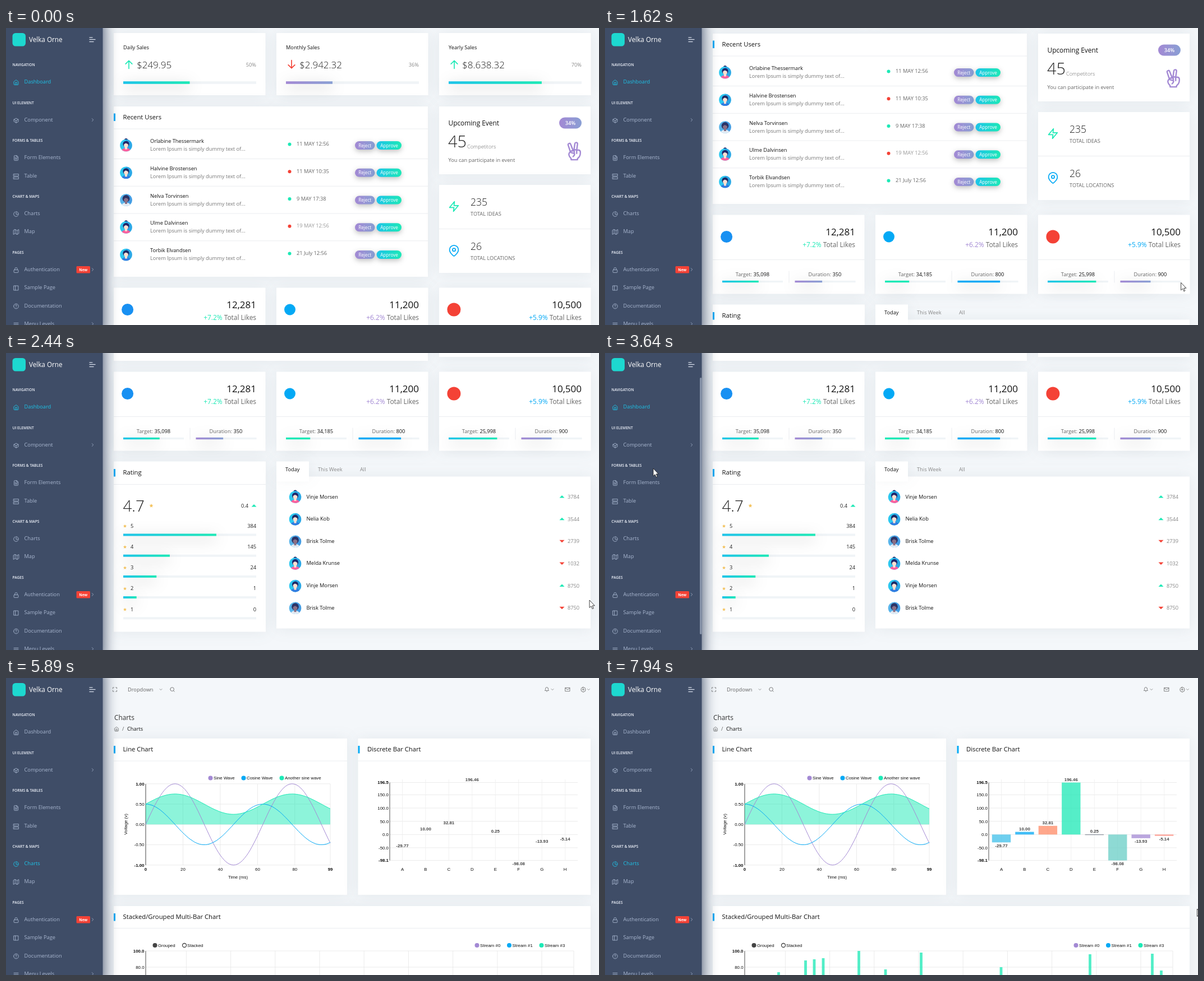
Write an HTML page that moves like this. It is 1057 by 530 pixels and loops after 8 s.

```html
<!DOCTYPE html>
<html lang="en">
<head>
<meta charset="utf-8">
<title>Admin dashboard</title>
<style>
  html, body { margin: 0; width: 100%; height: 100%; overflow: hidden; background: #f4f7fa; }
  svg { display: block; width: 100vw; height: 100vh; font-family: "Open Sans", sans-serif; }
  .chart { font-family: "Liberation Sans", Arial, sans-serif; }
  .card { filter: drop-shadow(0 1px 13px rgba(69, 90, 100, .09)); }
  .glow { filter: drop-shadow(0 6.5px 13px rgba(0, 0, 0, .3)); }
  .button { filter: drop-shadow(0 3px 5px rgba(0, 0, 0, .25)); }
  .side { filter: drop-shadow(1px 0 13px #3f4d67); }
</style>
</head>
<body>
<svg id="stage" viewBox="0 0 1057 530"></svg>
<script>
const TEAL = '#1de9b6', BLUE = '#04a9f5', PURPLE = '#a389d4', RED = '#f44236', GOLD = '#f4c25b';
const INK = '#111', GREY = '#666', MUTED = '#888', SIDE = '#a9b7d0';
const SEA = 'url(#sea)', LILAC = 'url(#lilac)';
const BOLD = 'font-weight="700"', LIGHT = 'font-weight="300"';
const END = 'text-anchor="end"', MID = 'text-anchor="middle"';

// Icon outlines on a 24 unit grid
const ICONS = {
  home: 'M3 9l9-7 9 7v11a2 2 0 0 1-2 2H5a2 2 0 0 1-2-2zM9 22V12h6v10',
  box: 'M21 16V8l-9-5-9 5v8l9 5zM3 8l9 5 9-5M12 22V13',
  file: 'M14 2H6a2 2 0 0 0-2 2v16a2 2 0 0 0 2 2h12a2 2 0 0 0 2-2V8zM14 2v6h6M16 13H8M16 17H8M10 9H8',
  server: 'M2 2h20v8H2zM2 14h20v8H2zM6 6h0M6 18h0',
  pie: 'M21.2 15.9A10 10 0 1 1 8 2.8M22 12A10 10 0 0 0 12 2v10z',
  map: 'M1 6v16l7-4 8 4 7-4V2l-7 4-8-4zM8 2v16M16 6v16',
  lock: 'M5 11h14a2 2 0 0 1 2 2v7a2 2 0 0 1-2 2H5a2 2 0 0 1-2-2v-7a2 2 0 0 1 2-2zM7 11V7a5 5 0 0 1 10 0v4',
  panel: 'M3 3h18v18H3zM9 3v18',
  help: 'M2 12a10 10 0 1 0 20 0a10 10 0 1 0-20 0M9 9a3 3 0 0 1 6 1c0 2-3 3-3 3M12 17h0',
  menu: 'M3 12h18M3 6h18M3 18h18',
  zap: 'M13 2L3 14h9l-1 8 10-12h-9z',
  pin: 'M21 10c0 7-9 13-9 13s-9-6-9-13a9 9 0 0 1 18 0zM9 10a3 3 0 1 0 6 0a3 3 0 1 0-6 0',
  up: 'M12 21V4M5 11l7-7 7 7',
  down: 'M12 3v17M5 13l7 7 7-7',
  right: 'M9 18l6-6-6-6',
  drop: 'M6 9l6 6 6-6',
  full: 'M8 3H3v5M21 8V3h-5M16 21h5v-5M3 16v5h5',
  search: 'M3 11a8 8 0 1 0 16 0a8 8 0 1 0-16 0M21 21l-4.3-4.3',
  bell: 'M18 8A6 6 0 0 0 6 8c0 7-3 9-3 9h18s-3-2-3-9M13.7 21a2 2 0 0 1-3.4 0',
  mail: 'M2 4h20v16H2zM22 6l-10 7L2 6',
  gear: 'M9 12a3 3 0 1 0 6 0a3 3 0 1 0-6 0M10 2h4l1 3 3-1 3 3-1 3 2 1v3l-2 1 1 3-3 3-3-1-1 3h-4l-1-3-3 1-3-3 1-3-2-1v-3l2-1-1-3 3-3 3 1z',
  peace: 'M7 13L4.3 4.600a1.600 1.600 0 0 1 3.100-1.100L10.500 11.500M11.500 11l1.200-8.200a1.600 1.600 0 0 1 3.300.4L15 11M7 13c-3 2-2 6 1 8.500V23h8v-1.500c3-2 4-5 3.500-9q-1-2.500-4-1.500-4-1.500-5 1-3-.5-3 1zM8 14l4 1q1 2-1.500 4M15 11v4M12 12v3'
};

const text = (x, y, s, size = 9.25, fill = GREY, more = '') =>
  `<text x="${x}" y="${y}" font-size="${size}" fill="${fill}" ${more}>${s}</text>`;
const label = (x, y, s, more = '') => text(x, y, s, 7.86, '#111', more);
const rect = (x, y, w, h, fill, more = '') =>
  `<rect x="${x}" y="${y}" width="${w}" height="${h}" fill="${fill}" ${more}/>`;
const dot = (x, y, r, fill, more = '') => `<circle cx="${x}" cy="${y}" r="${r}" fill="${fill}" ${more}/>`;
const line = (x1, y1, x2, y2, color = '#e6e9ed', w = .8) =>
  `<path d="M${x1} ${y1}L${x2} ${y2}" stroke="${color}" stroke-width="${w}"/>`;
const icon = (name, x, y, size, color = 'currentColor', weight = 2) =>
  `<path d="${ICONS[name]}" transform="translate(${x - size / 2} ${y - size / 2}) scale(${size / 24})" fill="none"
    stroke="${color}" stroke-width="${weight}" stroke-linecap="round" stroke-linejoin="round"/>`;
const card = (x, y, w, h) => rect(x, y, w, h, '#fff', 'class="card"');
const heading = (x, y, s) => rect(x, y - 10, 3, 13.500, BLUE) + text(x + 16.500, y, s, 11.25, INK);
const progress = (x, y, w, h, part, fill) =>
  rect(x, y - h / 2, w, h, '#f0f4f7') + rect(x, y - h / 2, w * part, h, fill, 'class="glow"');
const trend = (x, y, rising) =>
  `<path d="M${x - 4.500} ${y + (rising ? 2 : -2)}h9l-4.500 ${rising ? -4.500 : 4.500}z" fill="${rising ? TEAL : RED}"/>`;
const star = (x, y, r) => {
  const points = Array.from({ length: 10 }, (_, i) => {
    const a = i * Math.PI / 5, d = i % 2 ? r * .45 : r;
    return (x + d * Math.sin(a)).toFixed(2) + ',' + (y - d * Math.cos(a)).toFixed(2);
  });
  return `<polygon points="${points.join(' ')}" fill="${GOLD}"/>`;
};
const each = (list, draw) => list.map(draw).join('');

function avatar(x, y, kind) {
  const [shirt, skin, hair] = [
    ['#ff5f9e', '#fde0d2', '#20276b'], ['#2f7be0', '#fde0d2', '#1d2a66'], ['#e4edf5', '#8a6f86', '#2b3467']
  ][kind];
  const back = kind === 2 ? '#58b4ea' : '#2cc8f0';
  const bun = kind === 0 ? dot(0, -9.500, 3, hair) : '';
  return `<g transform="translate(${x} ${y})">${bun}${dot(0, 0, 10.800, back)}
    <g clip-path="url(#round)"><path d="M0-11a11 11 0 0 1 0 22z" fill="#2a7fdc" opacity=".45"/>
    ${dot(0, -2.500, kind === 2 ? 6.400 : 5.600, hair)}
    <ellipse cy="11" rx="8.500" ry="6.500" fill="${shirt}"/>${rect(-2, 1, 4, 6, skin)}
    <ellipse cy="-.5" rx="3.900" ry="4.600" fill="${skin}"/>
    <path d="M-4.500-1.500q0-5 4.500-5t4.500 5q-3-2-5-2.500-2 1-4 2.500z" fill="${hair}"/></g></g>`;
}

function salesCard([x, title, direction, amount, percent, part, fill]) {
  return card(x, 9, 270.500, 111) + text(x + 17, 38, title, 9.25, INK)
    + icon(direction, x + 27, 65, 20, direction === 'up' ? TEAL : RED)
    + text(x + 41, 72, amount, 17, '#222', LIGHT) + text(x + 254, 69, percent, 9.25, MUTED, END)
    + progress(x + 17, 97.500, 237, 4.600, part, fill);
}

function userRow([name, date, online], i) {
  const y = 48.750 * i;
  return `<g transform="translate(0 ${y})">` + avatar(214, 209.500, i % 3)
    + text(257, 205, name, 9.25, INK) + text(257, 219, 'Lorem Ipsum is simply dummy text of...', 9.25, '#777')
    + dot(505.500, 207.500, 3, online ? TEAL : RED)
    + text(518, 210, date, 9.25, i === 3 ? '#999' : GREY)
    + rect(622, 202, 35.500, 15, LILAC, 'rx="7.500" class="button"') + rect(660.500, 202, 44.500, 15, SEA, 'rx="7.500" class="button"')
    + text(639.700, 212.600, 'Reject', 8.1, '#fff', MID) + text(683, 212.600, 'Approve', 8.1, '#fff', MID)
    + (i < 4 ? line(192, 233.500, 752, 233.500) : '') + '</g>';
}

function socialCard([x, mark, radius, count, change, tint, goals]) {
  return card(x, 52, 270.500, 141) + dot(x + 12 + radius * 1.200, 91, radius, mark)
    + text(x + 254, 88.500, count, 17, INK, END)
    + text(x + 254, 109, `<tspan fill="${tint}">${change}</tspan> Total Likes`, 11.9, GREY, END)
    + line(x, 132, x + 270.500, 132) + line(x + 136, 152, x + 136, 173)
    + each(goals, ([name, value, part, fill], i) =>
      text(x + 71 + i * 129, 161, `${name}: <tspan fill="${INK}">${value}</tspan>`, 9.25, GREY, MID)
      + progress(x + 17 + i * 129.500, 171, 108, 3.400, part, fill));
}

const ratingRow = ([count, part], i) => {
  const y = 37.200 * i;
  return star(212, 327.500 + y, 3.200) + text(222, 330.300 + y, 5 - i, 9.25, '#222')
    + text(446, 330.300 + y, count, 9.25, '#222', END) + progress(209, 343 + y, 237, 4, part, SEA);
};

const rankRow = ([name, value, rising], i) => {
  const y = 39.650 * i;
  return avatar(515.500, 275.500 + y, i % 3) + text(535.500, 278 + y, name, 9.25, INK)
    + trend(991, 275 + y, rising) + text(1001, 278.500 + y, value, 9.25, MUTED);
};

const dashboard = each([
  [192, 'Daily Sales', 'up', '$249.95', '50%', .5, SEA],
  [482, 'Monthly Sales', 'down', '$2.942.32', '36%', .35, LILAC],
  [772, 'Yearly Sales', 'up', '$8.638.32', '70%', .7, SEA]], salesCard)
  + card(192, 140, 560, 304) + heading(192, 162.500, 'Recent Users') + line(192, 180, 752, 180)
  + each([
    ['Orlabine Thessermark', '11 MAY 12:56', 1], ['Halvine Brostensen', '11 MAY 10:35', 0],
    ['Nelva Torvinsen', '9 MAY 17:38', 1], ['Ulme Dalvinsen', '19 MAY 12:56', 0],
    ['Torbik Elvandsen', '21 July 12:56', 1]], userRow)
  + card(772, 140, 270, 121) + text(788.500, 173.500, 'Upcoming Event', 11.9, INK)
  + rect(986, 159.500, 40, 20, LILAC, 'rx="10"') + text(1006, 173, '34%', 9.25, '#fff', MID + ' font-weight="600"')
  + text(788, 213, '45', 28.8, '#222', LIGHT) + text(822, 215, 'Competitors', 9.2, GREY, LIGHT)
  + text(788.500, 239, 'You can participate in event') + icon('peace', 1013, 219.500, 34, PURPLE, 1.700)
  + card(772, 280, 270, 157) + line(772, 358.500, 1042, 358.500)
  + icon('zap', 798.500, 318.500, 21, TEAL) + text(828, 317, '235', 17.5, '#222', LIGHT) + text(828, 335, 'TOTAL IDEAS')
  + icon('pin', 798.500, 397.500, 21, BLUE) + text(828, 395.500, '26', 17.5, '#222', LIGHT) + text(828, 414, 'TOTAL LOCATIONS')
  + '<g transform="translate(0 411.500)">'
  + each([
    [192, '#1890f2', 10.500, '12,281', '+7.2%', TEAL, [['Target', '35,098', .6, SEA], ['Duration', 350, .45, LILAC]]],
    [482, BLUE, 10, '11,200', '+6.2%', PURPLE, [['Target', '34,185', .4, TEAL], ['Duration', 800, .7, BLUE]]],
    [772, RED, 12, '10,500', '+5.9%', BLUE, [['Target', '25,998', .8, SEA], ['Duration', 900, .5, LILAC]]]], socialCard)
  + card(192, 212, 271, 304) + heading(192, 235.500, 'Rating') + line(192, 253, 463, 253)
  + text(208.500, 301, '4.7', 27.8, '#222', LIGHT) + star(259, 291, 3.700)
  + text(432, 294.300, '0.4', 9.25, '#222', END) + trend(442, 291, true)
  + each([[384, .7], [145, .35], [24, .25], [1, .1], [0, 0]], ratingRow)
  + card(482, 239, 560, 271) + card(482, 212, 58, 28) + rect(482, 238, 58, 10, '#fff')
  + text(498, 229.500, 'Today', 9.25, INK) + text(556, 229.500, 'This Week', 9.25, MUTED) + text(631, 229.500, 'All', 9.25, MUTED)
  + each([
    ['Vinje Morsen', 3784, 1], ['Nelia Kob', 3544, 1], ['Brisk Tolme', 2739, 0],
    ['Melda Krunse', 1032, 0], ['Vinje Morsen', 8750, 1], ['Brisk Tolme', 8750, 0]], rankRow)
  + '</g>';

const GRID = '#e6e6e6';
const legend = (x, y, fill, name) => dot(x, y, 4, fill) + label(x + 5.500, y + 2.800, name);

function lineChart() {
  const px = i => 249 + i * 329 / 99, py = v => 261.300 - v * 72.500;
  const curve = f => Array.from({ length: 100 }, (_, i) => `${px(i).toFixed(1)} ${py(f(i / 10)).toFixed(1)}`).join('L');
  const stroke = (f, color) => `<path d="M${curve(f)}" fill="none" stroke="${color}"/>`;
  const wave = a => .5 + .25 * Math.sin(a);
  return legend(364.500, 178.500, PURPLE, 'Sine Wave') + legend(423.500, 178.500, BLUE, 'Cosine Wave')
    + legend(491.500, 178.500, TEAL, 'Another sine wave')
    + each([1, .5, 0, -.5, -1], v => line(249, py(v), 578, py(v), GRID)
      + label(246.500, py(v) + 2.800, v.toFixed(2), END + (Math.abs(v) === 1 ? BOLD : '')))
    + each([0, 20, 40, 60, 80, 99], i => line(px(i), 189, px(i), 334, GRID)
      + label(px(i), 344, i, MID + (i % 99 ? '' : BOLD)))
    + line(249, 189, 249, 334, '#222')
    + `<path d="M249 ${py(0)}L${curve(wave)}V${py(0)}z" fill="${TEAL}" opacity=".5"/>`
    + stroke(Math.sin, PURPLE) + stroke(a => .5 * Math.cos(a), BLUE) + stroke(wave, TEAL)
    + label(413.500, 358, 'Time (ms)', MID) + label(0, 0, 'Voltage (v)', MID + ' transform="translate(215.500 261) rotate(-90)"');
}

function barChart() {
  const py = v => 279.300 - v * .4719, px = i => 706.500 + i * 41.450;
  const bars = [
    [-29.77, '#3ebfea'], [10, BLUE], [32.81, '#ff8a65'], [196.46, TEAL],
    [.25, '#4c5667'], [-98.08, '#69cec6'], [-13.93, PURPLE], [-5.14, '#fe8a7d']];
  return each([196.5, 150, 100, 50, 0, -50, -98.1], (v, i) => line(684, py(v), 1019, py(v), GRID)
      + label(682, py(v) + 2.800, v.toFixed(1), END + (i % 6 ? '' : BOLD)))
    + each(bars, (_, i) => line(px(i), 181, px(i), 325.500, '#eee') + label(px(i), 344, 'ABCDEFGH'[i], MID))
    + line(684, 186.500, 684, 325.500, '#222')
    + '<g id="bars">' + each(bars, ([v, fill], i) =>
      rect(px(i) - 16.700, Math.min(py(v), py(0)), 33.400, Math.max(1, Math.abs(py(v) - py(0))), fill)) + '</g>'
    + each(bars, ([v], i) => text(px(i), v < 0 ? py(v) + 8.600 : py(v) - 2.800, v.toFixed(2), 7.86, '#444', MID + BOLD));
}

function streamChart() {
  const tops = [[309.5, 525], [357.5, 504], [373, 502], [389, 500], [452.5, 487], [500, 520],
    [563.5, 490], [706, 516], [864.5, 493], [975.5, 492], [991.5, 522]];
  return dot(265.500, 477, 4, '#444') + label(271, 479.800, 'Grouped')
    + dot(318, 477, 3.500, '#fff', 'stroke="#444" stroke-width="1.300"') + label(323, 479.800, 'Stacked')
    + legend(839.500, 477, PURPLE, 'Stream #0') + legend(897, 477, BLUE, 'Stream #1') + legend(954.500, 477, TEAL, 'Stream #3')
    + line(249, 487, 1012, 487, GRID) + line(249, 516, 1012, 516, GRID)
    + each([...Array(10).keys()], i => { const x = i < 9 ? 321.400 + i * 79.200 : 1012; return line(x, 487, x, 530, GRID); })
    + line(249, 487, 249, 530, '#222')
    + label(246.500, 489.800, '100.0', END + BOLD) + label(246.500, 518.800, '80.0', END)
    + `<g id="streams" fill="${TEAL}" opacity=".76">` + each(tops, ([x, y]) => rect(x - 2.400, y, 4.800, 632 - y, TEAL)) + '</g>';
}

const charts = `<g color="${GREY}">` + icon('full', 194, 20.500, 9.500) + text(217, 24, 'Dropdown') + icon('drop', 276, 20.500, 8)
  + icon('search', 296.500, 20.500, 10) + icon('bell', 964, 20.500, 9.500) + icon('drop', 974, 20.500, 8)
  + icon('mail', 1001, 20.500, 9.500) + icon('gear', 1029, 20.500, 10) + icon('drop', 1038.500, 20.500, 8)
  + text(193, 75, 'Charts', 11.8, '#333') + icon('home', 197, 91, 9) + text(207, 94.300, '/')
  + text(216, 94.300, 'Charts', 9.25, INK, 'font-weight="500"') + '</g>'
  + '<g id="cards">' + card(192, 108, 416, 279) + heading(192, 131, 'Line Chart') + line(192, 148, 608, 148)
  + card(627.500, 108, 414.500, 279) + heading(627.500, 131, 'Discrete Bar Chart') + line(627.500, 148, 1042, 148)
  + card(192, 407, 850, 300) + heading(192, 430, 'Stacked/Grouped Multi-Bar Chart') + line(192, 446.500, 1042, 446.500)
  + '<g class="chart">' + lineChart() + barChart() + streamChart() + '</g></g>';

const sidebar = rect(-20, -20, 192.500, 570, '#3f4d67', 'class="side"')
  + rect(11.500, 9, 23.500, 23.500, '#1dd8d0', 'rx="5.500"') + text(41, 25, 'Velka Orne', 11.7, '#fff')
  + each([[17, 6], [20.5, 11], [24.5, 8]], ([y, w]) => line(148.500, y, 148.500 + w, y, '#dce3ef', 1.200))
  + each([['NAVIGATION', 65], ['UI ELEMENT', 133], ['FORMS &amp; TABLES', 200], ['CHART &amp; MAPS', 300], ['PAGES', 400]],
    ([s, y]) => text(11.500, y + 2.500, s, 6.6, '#eef2fa', 'font-weight="600"'))
  + each([
    ['Dashboard', 96, 'home'], ['Component', 164, 'box'], ['Form Elements', 231, 'file'], ['Table', 264, 'server'],
    ['Charts', 331, 'pie'], ['Map', 363, 'map'], ['Authentication', 431, 'lock'], ['Sample Page', 463, 'panel'],
    ['Documentation', 495.5, 'help'], ['Menu Levels', 528, 'menu']], ([name, y, picture]) =>
    `<g id="item-${name.split(' ')[0]}" color="${SIDE}">${icon(picture, 18, y + 1, 10.500)}${text(32.500, y + 3.300, name, 9.25, 'currentColor')}</g>`)
  + each([164, 431, 528], y => icon('right', 154.500, y, 9.500, SIDE))
  + rect(125.500, 425, 24.500, 12.500, RED, 'rx="1.500"') + text(137.700, 433.500, 'New', 6.6, '#fff', MID + BOLD)
  + rect(169, 44, 3.500, 458, '#8793a9', 'rx="1.700" id="thumb"');

const stage = document.getElementById('stage');
stage.innerHTML = `<defs>
  <linearGradient id="sea"><stop stop-color="#1dc4e9"/><stop offset="1" stop-color="${TEAL}"/></linearGradient>
  <linearGradient id="lilac"><stop stop-color="${PURPLE}"/><stop offset="1" stop-color="#899fd4"/></linearGradient>
  <clipPath id="round"><circle r="10.800"/></clipPath></defs>
  ${rect(0, 0, 1057, 530, '#f4f7fa')}<g id="dashboard">${dashboard}</g><g id="charts">${charts}</g>${sidebar}
  <g id="status"><path d="M0 520h295q3 0 3 3v7H0z" fill="#2b2c2f"/>${text(3, 532, '', 9.25, '#c8cacd', 'id="link"')}</g>
  <path id="cursor" d="M0 0V13.500L3.100 10.700L5.200 15.500L7.300 14.600L5.200 9.900H9.300z" fill="#fff" stroke="#111" stroke-width=".8"/>`;

// Each key: step, then the values reached at that step
const SCROLL = [[0, 0], [2, 0], [3, 4], [4, 130], [5, 330], [6, 411.5], [7, 430]];
const POINTER = [[0, 985, 560], [1, 990, 525], [3, 1020, 461], [6, 1040, 441], [10, 1040, 441], [12, 270, 250],
  [14, 86, 206], [18, 40, 325], [19, 27, 365], [20, 21, 410], [22, 14, 480], [24, 8, 560], [30, 920, 560],
  [31, 942, 515], [35, 1055.5, 412]];
const FADE = [[26, 0], [28, .25], [30, .75]];
const GROW = [[28, 0], [30, 1]];

function sample(keys, step) {
  const next = keys.findIndex(k => k[0] > step);
  if (next === 0) return keys[0].slice(1);
  if (next < 0) return keys.at(-1).slice(1);
  const a = keys[next - 1], b = keys[next], p = (step - a[0]) / (b[0] - a[0]);
  return a.slice(1).map((v, i) => v + (b[i + 1] - v) * p);
}

const get = id => document.getElementById(id);
const move = (id, x, y) => get(id).setAttribute('transform', `translate(${x} ${y})`);
const show = (id, on) => get(id).setAttribute('display', on ? 'inline' : 'none');

function render(step) {
  const onCharts = step >= 19;
  show('dashboard', !onCharts);
  show('charts', onCharts);
  show('cards', step >= 22);
  show('thumb', step >= 13 && step < 25);
  show('status', step >= 17 && step < 25);
  get('link').textContent = 'lite.velmorants.test/velka-orne/basic/default/' + (onCharts ? 'maps/region-map' : 'charts/line-plot');
  get('item-Dashboard').setAttribute('color', onCharts ? SIDE : '#1dc4e9');
  get('item-Charts').setAttribute('color', onCharts ? '#1dc4e9' : SIDE);
  move('dashboard', 0, -sample(SCROLL, step)[0]);
  move('cursor', ...sample(POINTER, step));
  get('bars').setAttribute('opacity', sample(FADE, step)[0]);
  const grown = sample(GROW, step)[0];
  get('streams').setAttribute('transform', `translate(0 ${632 * (1 - grown)}) scale(1 ${grown})`);
}

// The picture advances in steps of about a fifth of a second after a first pause
const start = performance.now();
let shown = -1;
function tick() {
  const t = (performance.now() - start) % 8000;
  const step = t < 990 ? 0 : Math.floor((t - 970) / 204.4) + 1;
  if (step !== shown) render(shown = step);
  requestAnimationFrame(tick);
}
tick();
</script>
</body>
</html>
```
